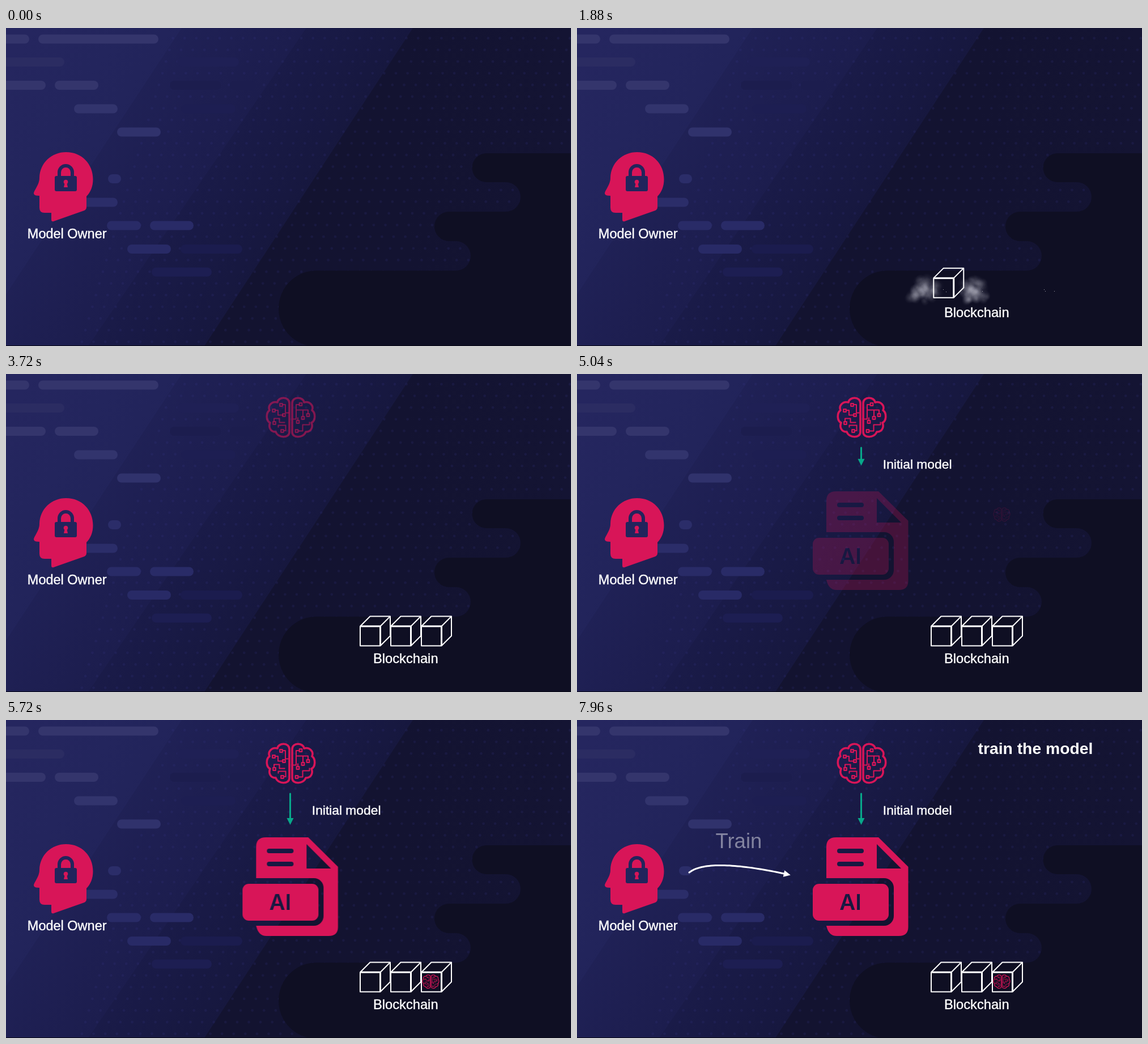
These frames come from a looping animation (997 by 561 pixels, 8 s). An HTML page with a canvas:

```html
<!DOCTYPE html>
<html lang="en">
<head>
<meta charset="utf-8">
<title>Train the model</title>
<style>
html, body { margin: 0; width: 100%; height: 100%; overflow: hidden; background: #131330; }
canvas { display: block; width: 997px; height: 561px; }
</style>
</head>
<body>
<canvas id="stage" width="997" height="561"></canvas>
<script>
const W = 997, H = 561, LOOP = 8000;
const PINK = '#d81558', GREEN = '#08a88a', NAVY = '#22245c', WHITE = '#fff';
const SANS = '"Liberation Sans", Arial, sans-serif';
const ctx = document.getElementById('stage').getContext('2d');

const clamp = v => Math.max(0, Math.min(1, v));
const span = (t, from, length) => clamp((t - from) / length);
const ease = p => (1 - Math.cos(Math.PI * p)) / 2;
const fade = (t, from, length) => ease(span(t, from, length));

function layer(draw) {
  const c = document.createElement('canvas');
  c.width = W;
  c.height = H;
  draw(c.getContext('2d'));
  return c;
}

function random(seed) {
  return () => {
    seed = (seed * 16807) % 2147483647;
    return seed / 2147483647;
  };
}

function rounded(g, x, y, w, h, r, color) {
  g.fillStyle = color;
  g.beginPath();
  g.roundRect(x, y, w, h, r);
  g.fill();
}

function gradient(g, x0, y0, x1, y1, ...colors) {
  const fill = g.createLinearGradient(x0, y0, x1, y1);
  colors.forEach((c, i) => fill.addColorStop(i / (colors.length - 1), c));
  return fill;
}

// Everything left of a slanted edge.
function band(g, top, bottom, fill) {
  g.fillStyle = fill;
  g.beginPath();
  g.moveTo(0, 0);
  g.lineTo(top, 0);
  g.lineTo(bottom, H);
  g.lineTo(0, H);
  g.fill();
}

function drawBackdrop(g) {
  g.fillStyle = gradient(g, 400, 0, W, 0, '#131330', '#131331', '#141433');
  g.fillRect(0, 0, W, H);
  band(g, 718, 350, gradient(g, 240, 160, 560, 370, '#1d1e50', '#191a46', '#15163a'));
  band(g, 530, 145, gradient(g, 140, 120, 400, 290, '#212359', '#1e1f52', '#1b1c4b'));
  band(g, 310, -60, gradient(g, 0, 60, 230, 210, '#25265f', '#23255d', '#212359'));

  g.fillStyle = 'rgba(58,60,145,.17)';
  for (let y = 18; y < H; y += 20.6) {
    for (let x = 300 - y * .3; x < W; x += 20.6) {
      g.beginPath();
      g.arc(x, y, 2.4, 0, 7);
      g.fill();
    }
  }

  const pills = [
    [19.5, '#34356c', -20, 41, 57, 269],
    [60, '#2b2c62', -20, 103],
    [60, '#1f2055', 302, 411],
    [101, '#34356c', -20, 70, 86, 163],
    [101, '#1c1d4e', 289, 379, 395, 440],
    [142.5, '#32346d', 120, 197],
    [142.5, '#1d1e52', 309, 405],
    [183.5, '#30326c', 196, 273],
    [266, '#2b2d69', 180, 203],
    [307.5, '#2b2d69', 120, 197],
    [348.5, '#292b67', 178, 238, 254, 331],
    [390, '#282a66', 214, 291],
    [390, '#1b1c4e', 308, 417],
    [430.5, '#1d1e52', 257, 363]
  ];
  for (const [y, color, ...ends] of pills) {
    for (let i = 0; i < ends.length; i += 2) {
      rounded(g, ends[i], y - 8, ends[i + 1] - ends[i], 16, 8, color);
    }
  }

  // Dark cloud
  const q = Math.PI / 2;
  g.fillStyle = '#0f0f23';
  g.beginPath();
  g.moveTo(W, 221);
  g.arc(848, 246.5, 25.5, -q, q, true);
  g.arc(882, 298, 26, -q, q);
  g.arc(782, 350, 26, -q, q, true);
  g.arc(794, 402, 26, -q, q);
  g.arc(548, 495, 67, -q, q, true);
  g.lineTo(W, H);
  g.fill();

  g.fillStyle = '#090916';
  g.fillRect(0, H - 1, W, 1);

  // Owner's head with a padlock
  g.fillStyle = PINK;
  g.fill(new Path2D('M106 219C134 219 153.500 240 153.500 267C153.500 280 149 290 142 297V316Q142 320 138 322L84 341Q80 342 80 338V326H68Q59 326 59 317V296L53 295.500Q47 294 50 288C56 277 59 272 59 264C60 238 80 219 106 219Z'));
  rounded(g, 86, 261, 39, 27, 3, NAVY);
  g.strokeStyle = NAVY;
  g.lineWidth = 6;
  g.stroke(new Path2D('M94 263V254.500A11.500 11.500 0 0 1 117 254.500V263'));
  g.fillStyle = PINK;
  g.beginPath();
  g.arc(105.5, 271.5, 3.8, 0, 7);
  g.fill();
  g.fill(new Path2D('M104 272H107L109 281H102Z'));
  text(g, 'Model Owner', 37.8, 371, `23.5px ${SANS}`);
}

function text(g, words, x, y, font, alpha = 1, weight = .4) {
  if (alpha <= 0) return;
  g.save();
  g.globalAlpha = alpha;
  g.font = font;
  g.fillStyle = g.strokeStyle = WHITE;
  g.fillText(words, x, y);
  if (weight) {
    g.lineWidth = weight;
    g.strokeText(words, x, y);
  }
  g.restore();
}

// Document icon; the gaps are cut out so it can fade as one piece.
function drawDocument(g) {
  g.fillStyle = PINK;
  g.fill(new Path2D('M457 207H532L584.500 259V365Q584.500 381 568 381H458Q444 381 440 363V224Q440 207 457 207Z'));
  g.globalCompositeOperation = 'destination-out';
  rounded(g, 400, 279, 159, 84, 17, '#000');
  rounded(g, 459, 227, 47, 8, 4, '#000');
  rounded(g, 459, 250, 47, 8, 4, '#000');
  g.fill(new Path2D('M529 219V262H572Z'));
  g.globalCompositeOperation = 'source-over';
  rounded(g, 416, 289, 134, 65, 11, PINK);
  g.globalCompositeOperation = 'destination-out';
  g.font = '600 38.5px Inter, "Open Sans", sans-serif';
  g.textAlign = 'center';
  g.fillText('AI', 482.5, 334.5);
}

const lobe = new Path2D('M-2.500 -25C-2.500 -37 -22 -37 -23.500 -26.500C-34 -29 -41 -20 -37.500 -12.500C-44 -8 -44 6 -36.500 9.500C-40 18 -35 26 -26.500 25.500C-22.500 37 -2.500 37 -2.500 26Z');
const wiresLeft = new Path2D('M-14.500 -22.500H-9.500V-8H-3M-27.500 -12.500H-22.500V-4H-13M-29.500 7V2H-20V9H-10M-12 23.500H-9V14H-22V18');
const wiresRight = new Path2D('M15 -22.500H9.500V3H4M9.500 -13H30.500V-7M21.500 -2V-13M12.500 5V0M13.500 24H21V13H33V8');
const nodes = [[-17, -22], [-30, -12], [-12, -4], [-29, 10], [-15, 24], [17.5, -23], [30.5, -4], [21.5, 1], [12.5, 8], [10.5, 24]];

function brain(x, y, scale, alpha) {
  if (alpha <= 0) return;
  ctx.save();
  ctx.globalAlpha = alpha;
  ctx.translate(x, y);
  ctx.scale(scale, scale);
  ctx.strokeStyle = PINK;
  ctx.lineJoin = 'round';
  ctx.lineWidth = 3.6;
  ctx.stroke(lobe);
  ctx.lineWidth = 2;
  ctx.stroke(wiresLeft);
  ctx.stroke(wiresRight);
  ctx.lineWidth = 2.2;
  for (const [nx, ny] of nodes) ctx.strokeRect(nx - 2.3, ny - 2.3, 4.6, 4.6);
  ctx.scale(-1, 1);
  ctx.lineWidth = 3.6;
  ctx.stroke(lobe);
  ctx.restore();
}

// Shaft grows along a path and pushes its head in front.
function arrow(point, p, color, size) {
  if (p <= 0) return;
  const [x, y] = point(p), [bx, by] = point(p - .02);
  ctx.strokeStyle = ctx.fillStyle = color;
  ctx.lineWidth = 3;
  ctx.lineCap = 'round';
  ctx.beginPath();
  ctx.moveTo(...point(0));
  for (let i = 1; i <= 40; i++) ctx.lineTo(...point(p * i / 40));
  ctx.stroke();
  ctx.lineCap = 'butt';
  ctx.save();
  ctx.translate(x, y);
  ctx.rotate(Math.atan2(y - by, x - bx));
  ctx.beginPath();
  ctx.moveTo(size, 0);
  ctx.lineTo(0, 6);
  ctx.lineTo(0, -6);
  ctx.fill();
  ctx.restore();
}

const down = u => [501.5, 130 + 43 * u];
const bezier = (a, b, c, d, u) => {
  const v = 1 - u;
  return a * v ** 3 + 3 * b * v * v * u + 3 * c * v * u * u + d * u ** 3;
};
const across = u => [bezier(198, 222, 285, 365, u), bezier(269, 250, 254, 271, u)];

const cubeLines = new Path2D('M0 18H35.500V52.500H0ZM0 18L17.500 .5H53V35L35.500 52.500M35.500 18L53 .5');

function cube(x, y) {
  ctx.save();
  ctx.translate(x, y);
  ctx.strokeStyle = WHITE;
  ctx.lineWidth = 2;
  ctx.lineJoin = 'round';
  ctx.stroke(cubeLines);
  ctx.lineWidth = 3;
  ctx.stroke(new Path2D('M0 18H35.500V52.500'));
  ctx.restore();
}

const puff = layer(g => {
  const glow = g.createRadialGradient(32, 32, 0, 32, 32, 32);
  glow.addColorStop(0, 'rgba(225,225,235,1)');
  glow.addColorStop(.5, 'rgba(215,215,228,.5)');
  glow.addColorStop(1, 'rgba(215,215,228,0)');
  g.fillStyle = glow;
  g.fillRect(0, 0, 64, 64);
});

function dust(x, y, age, seed) {
  const left = 1 - age / 250;
  if (left <= 0) return;
  const rnd = random(seed), reach = 1 - Math.exp(-age / 18);
  ctx.save();
  for (let i = 0; i < 150; i++) {
    const side = i % 2 ? 1 : -1;
    const dist = 14 + 54 * (rnd() + rnd()) / 2 * 1.15 * reach;
    const rise = (rnd() + rnd() - 1) * 24 * reach;
    const r = 5 + 8 * rnd();
    ctx.globalAlpha = (.07 + .14 * rnd()) * left;
    ctx.drawImage(puff, 0, 0, 64, 64, x + side * dist - r, y + rise - r, 2 * r, 2 * r);
  }
  ctx.fillStyle = WHITE;
  ctx.globalAlpha = .8 * left;
  for (let i = 0; i < 6; i++) {
    const sx = x + (-115 + 448 * rnd()) * reach, sy = y + 4 - 8 * rnd();
    if (sx < 990) ctx.fillRect(Math.round(sx), Math.round(sy), 1, 1);
  }
  ctx.restore();
}

// Falls fast, raises dust and shakes to rest.
function dropCube(t, start, x, seed) {
  const fall = 165, y = 427;
  if (t < start) return;
  const age = t - start - fall;
  if (age < 0) {
    cube(x, y - 500 * (1 - ((t - start) / fall) ** 4));
    return;
  }
  dust(x + 31, y + 36, age, seed);
  const shake = age < 300 ? Math.exp(-age / 60) * Math.sin(age / 32) : 0;
  cube(x + 10 * shake, y - 9 * shake);
}

const backdrop = layer(drawBackdrop);
const documentIcon = layer(drawDocument);

function render(t) {
  ctx.globalAlpha = 1;
  ctx.drawImage(backdrop, 0, 0);
  text(ctx, 'Blockchain', 648, 510, `23.7px ${SANS}`, fade(t, 820, 560));

  dropCube(t, 1665, 625, 71);
  dropCube(t, 2345, 679, 913);
  dropCube(t, 2780, 733, 4177);

  brain(502.5, 76.5, 1, fade(t, 3380, 640));
  text(ctx, 'Initial model', 539.8, 167, `22.8px ${SANS}`, fade(t, 4140, 540));
  arrow(down, fade(t, 4710, 700), GREEN, 12);

  const shown = span(t, 4960, 330);
  if (shown > 0) {
    const sway = t > 5560 && t < 5960 ? 1.4 * Math.sin(Math.PI * span(t, 5560, 400)) : 0;
    ctx.globalAlpha = shown;
    ctx.drawImage(documentIcon, sway, 0);
    ctx.globalAlpha = 1;
    brain(749.5, 461.5 - 216 * (1 - fade(t, 5000, 600)), .345, shown * (.5 + shown / 2));
  }

  text(ctx, 'train the model', 707.5, 60, `bold 28.3px ${SANS}`, fade(t, 6790, 610), 0);
  arrow(across, fade(t, 7480, 420), WHITE, 12);
  text(ctx, 'Train', 244.5, 226, `36.5px ${SANS}`, fade(t, 7680, 600), 0);
}

const began = performance.now();
function tick() {
  render((performance.now() - began) % LOOP);
  requestAnimationFrame(tick);
}
tick();
</script>
</body>
</html>
```
